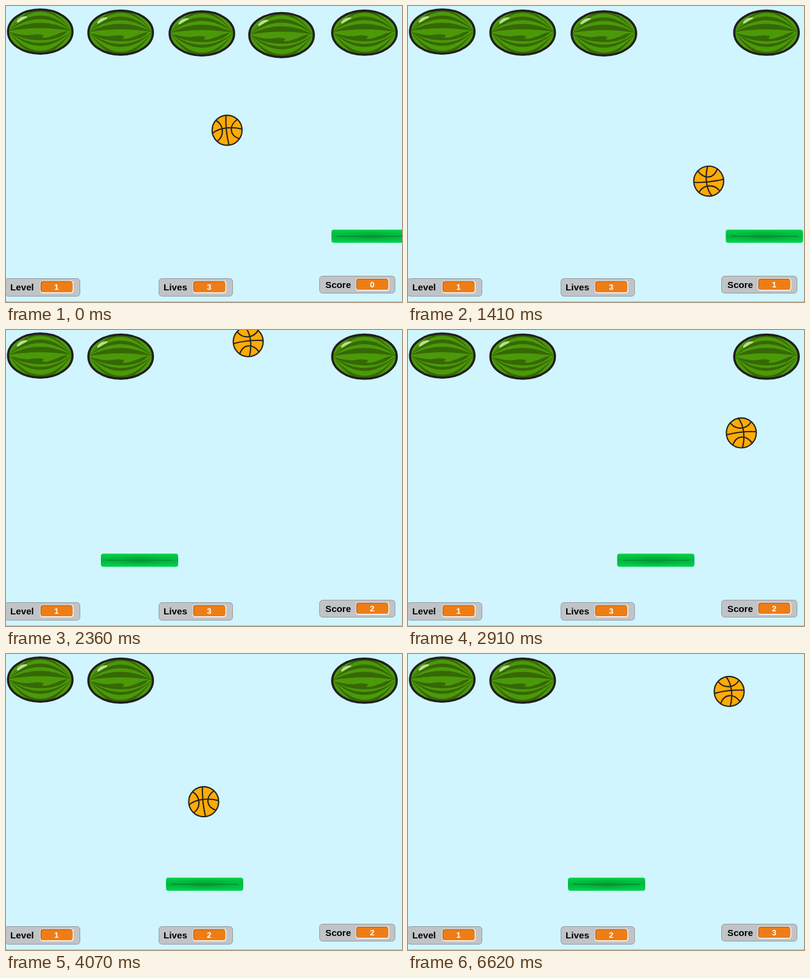
An HTML page for the animation above (6690 ms loop, 651x486 px).

```html
<!DOCTYPE html>
<html lang="en">
<head>
<meta charset="utf-8">
<title>Melon breakout</title>
<style>
  html, body { margin: 0; width: 100%; height: 100%; overflow: hidden; background: #d0f5ff; }
  svg { display: block; width: 651px; height: 486px; }
  text { font: bold 15.2px "Liberation Sans", Arial, sans-serif; }
  .value { font-size: 13.5px; fill: #fff; text-anchor: middle; }
</style>
</head>
<body>
<svg viewBox="0 0 651 486">
  <defs>
    <radialGradient id="groove">
      <stop offset="0" stop-color="#00942f"/>
      <stop offset="1" stop-color="#00b840" stop-opacity="0"/>
    </radialGradient>
    <linearGradient id="bar" x2="0" y2="1">
      <stop offset="0" stop-color="#00d24b"/>
      <stop offset=".5" stop-color="#00b63e"/>
      <stop offset="1" stop-color="#00d24b"/>
    </linearGradient>
    <clipPath id="rind"><ellipse rx="52" ry="36"/></clipPath>
    <g id="melon">
      <ellipse rx="53" ry="36.2" fill="#4b9909"/>
      <g id="stripes" clip-path="url(#rind)" fill="#366806">
        <path d="M-50 1C-38 4-28 6-18 6C-8 4 0 4 6 6L3 10C14 11 18 7 24 6C30 4 34 0 46-1C40 4 34 9 28 10C18 14 6 15-6 14C-22 13-38 9-50 1Z"/>
      </g>
      <path d="M-39-16C-36-22-29-26-22-25C-20-24-24-22-28-20C-32-18-37-13-39-16Z" fill="#b9de96"/>
      <ellipse rx="53" ry="36.2" fill="none" stroke="#211f20" stroke-width="3.6"/>
    </g>
  </defs>
  <rect width="651" height="486" fill="#d0f5ff"/>
  <path d="M0 485.5H651" stroke="#aeb9bd"/>
  <g id="melons"></g>
  <g id="monitors"></g>
  <g id="paddle">
    <rect y="367.3" width="127" height="21.4" rx="4" fill="url(#bar)"/>
    <ellipse cx="63.5" cy="378" rx="62" ry="9.5" fill="url(#groove)"/>
    <path d="M9 378H118" stroke="#008a2c" stroke-width="1.4"/>
  </g>
  <g id="ball" fill="none" stroke="#252323" stroke-width="2.1" stroke-linecap="round">
    <circle r="24.6" fill="#ffab05"/>
    <path d="M-2-24Q-3 0 3 24M-24 5C-12-5 8-6 24-2M-18-16C-5-8-5 9-15 17M17-18C3-8 3 8 20 14"/>
  </g>
  <path id="cursor" d="M.5.5V22L5.5 17.5L9.5 26.5L13 25L9.2 16.3H17Z" fill="#fff" stroke="#222"/>
</svg>
<script>
const LOOP = 6690, MISSED = 4070, RESTART = 5620;
const CENTER = { x: 325, y: 242.5 };
const BOUNDS = { top: 18, right: 624, paddle: 344, floor: 440 };
const byId = id => document.getElementById(id);

const melons = [[56.3, 42], [188.5, 43.7], [322, 45], [453, 47.7], [589.3, 43.8]]
  .map(([x, y]) => ({ x, y, hit: Infinity }));

// Key points [time, value]: distance rolled by the ball, left edge of the paddle
const TRAVEL = [
  [0, 0], [832, 233], [1911, 530], [2864, 811], [3562, 916], [MISSED, 1090],
  [5650, 1090], [6240, 1186], [6620, 1293]
];
const PADDLE = [
  [0, 535], [700, 535], [832, 617], [1200, 535], [1410, 522], [1911, 317],
  [2400, 140], [2864, 344], [3300, 263], [3560, 275], [4000, 275], [MISSED, 263]
];

function along(keys, t) {
  const i = keys.findLastIndex(k => k[0] <= t);
  const [t0, v0] = keys[i], [t1, v1] = keys[i + 1] || [Infinity, v0];
  return v0 + (v1 - v0) * (t - t0) / (t1 - t0);
}

// The picture is refreshed at an even pace, with one long rest after the miss
function snap(t) {
  const held = (from, to, count) =>
    Math.min(to, from + Math.floor((t - from) * count / (to - from) + 1e-6) * (to - from) / count);
  if (t < 70) return 0;
  return t < RESTART ? held(70, MISSED, 63) : held(RESTART, 6620, 16);
}

// The ball rolls diagonally and turns right by 90 degrees whenever it touches something
function play() {
  const path = [];
  let x = 363.5, y = 204, heading = 45, missedAt = Infinity;
  for (let t = 0; t < LOOP; t++) {
    const resting = missedAt < t && t < RESTART;
    const step = t && !resting ? along(TRAVEL, t) - along(TRAVEL, t - 1) : 0;
    const dx = Math.sign(Math.sin(heading * Math.PI / 180));
    const dy = -Math.sign(Math.cos(heading * Math.PI / 180));
    x += dx * step;
    y += dy * step;

    const melon = melons.find(m =>
      m.hit > t && Math.hypot((x - m.x) / 73, (y - m.y) / 60) <= 1);
    if (melon) melon.hit = t;
    const onPaddle = y >= BOUNDS.paddle && dy > 0 &&
      Math.abs(x - along(PADDLE, t) - 63.5) < 70;
    const onEdge = (x >= BOUNDS.right && dx > 0) || (y <= BOUNDS.top && dy < 0);
    if (melon || onPaddle || onEdge) heading += 90;

    if (y >= BOUNDS.floor) {
      ({ x, y } = CENTER);
      heading = 45;
      missedAt = t;
    }
    path.push({ x, y, turn: heading - 45, lives: missedAt <= t ? 2 : 3 });
  }
  return path;
}

function monitor(label, x, y, width, height, textX, valueX) {
  byId("monitors").insertAdjacentHTML("beforeend", `
    <rect x="${x + .5}" y="${y + .5}" width="${width}" height="${height}" rx="5" fill="#c1c4c7" stroke="#949a9d"/>
    <text x="${textX}" y="${y + 20}">${label}</text>
    <rect x="${valueX}" y="${y + 4}" width="55" height="20.5" rx="4.5" fill="#fff"/>
    <rect x="${valueX + .8}" y="${y + 4.8}" width="52.6" height="18.2" rx="4" fill="#a75a16"/>
    <rect x="${valueX + 2}" y="${y + 6}" width="51.4" height="17" rx="3" fill="#ee7d16"/>
    <text class="value" id="${label}" x="${valueX + 27}" y="${y + 19}">1</text>`);
}
monitor("Level", -2, 447, 123, 29, 7, 56);
monitor("Lives", 251, 447, 121, 29, 259, 307);
monitor("Score", 515, 443, 124, 28, 525, 575);

// Dark crescents from tip to tip, between two heights
const crescent = (a, b) => `<path d="M-52-1Q0 ${2 * a} 52-1Q0 ${2 * b}-52-1Z"/>`;
for (const [a, b] of [[-36, -32], [-26, -20], [-14, -5], [19, 24], [32, 38]])
  byId("stripes").insertAdjacentHTML("beforeend", crescent(a, b));

byId("melons").innerHTML = melons.map(m =>
  `<use href="#melon" transform="translate(${m.x} ${m.y})"/>`).join("");
const melonNodes = [...byId("melons").children];

const place = (id, x, y, turn = 0) =>
  byId(id).setAttribute("transform", `translate(${x} ${y}) rotate(${turn})`);
const show = (node, visible) => { node.style.display = visible ? "" : "none"; };

const path = play();

function draw(t) {
  const ball = path[Math.floor(t)];
  place("ball", ball.x, ball.y, ball.turn);
  place("paddle", along(PADDLE, t), 0);
  melons.forEach((m, i) => show(melonNodes[i], m.hit > t));
  byId("Score").textContent = melons.filter(m => m.hit <= t).length;
  byId("Lives").textContent = ball.lives;
  show(byId("cursor"), t >= RESTART && t < RESTART + 120);
  place("cursor", 630, t > RESTART ? 468 : 446);
}

const start = performance.now();
function tick() {
  draw(snap((performance.now() - start) % LOOP));
  requestAnimationFrame(tick);
}
tick();
</script>
</body>
</html>
```
